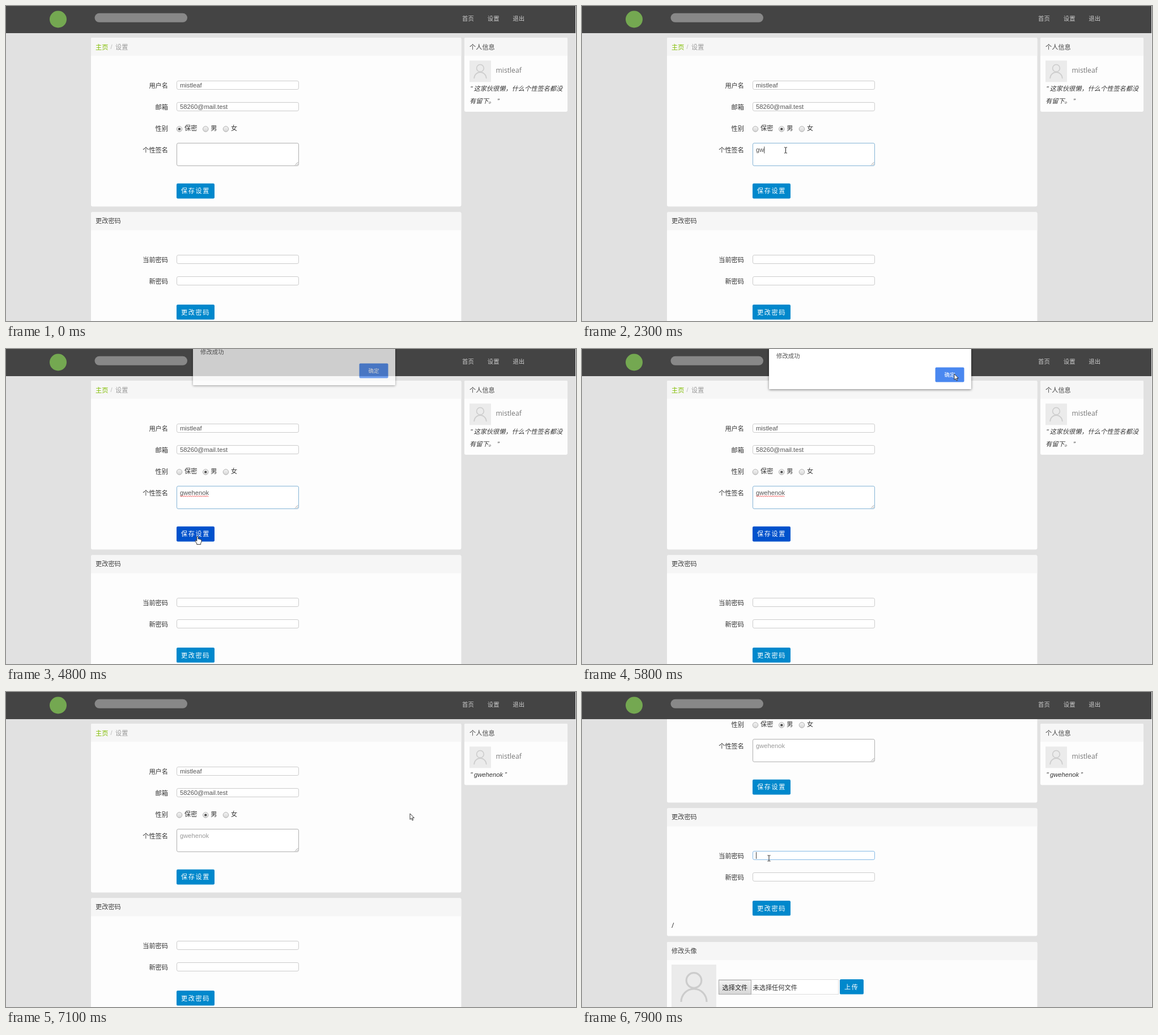
An HTML page that plays this animation: 1006x557 px, repeating every 8000 ms.

```html
<!DOCTYPE html>
<html lang="zh-CN">
<head>
<meta charset="utf-8">
<title>设置</title>
<style>
  html, body { margin: 0; width: 100%; height: 100%; overflow: hidden; background: #e1e1e1; }
  svg { display: block; width: 100%; height: 100%; }
  text { font-family: "Liberation Sans", "Noto Sans CJK SC", "Noto Sans CJK", sans-serif; white-space: pre; }
  .btn { letter-spacing: 1.6px; }
  .ui { font-family: "Open Sans", "Noto Sans CJK SC", sans-serif; }
  #dialog rect.box { filter: drop-shadow(0 1px 2px rgba(0, 0, 0, .5)); }
</style>
</head>
<body>
<svg id="stage" viewBox="0 0 1006 557" preserveAspectRatio="none">
  <defs>
    <linearGradient id="gray" x2="0" y2="1">
      <stop stop-color="#f4f4f4"/><stop offset="1" stop-color="#d6d6d6"/>
    </linearGradient>
    <clipPath id="view"><rect y="48" width="1006" height="509"/></clipPath>
    <g id="person" fill="none" stroke="#ccc" stroke-width="3.2">
      <rect width="79" height="79" fill="#ebebeb" stroke="none"/>
      <circle cx="39.5" cy="28" r="13.3"/>
      <path d="M17 66A22.5 23 0 0 1 62 66"/>
    </g>
  </defs>
  <g clip-path="url(#view)"><g id="page"></g></g>
  <g id="side"></g>
  <g id="top"></g>
  <g id="dialog"></g>
  <g id="cursor">
    <path id="arrow" d="M0 0V10.4L2.4 8.2L4 12L5.7 11.3L4.1 7.6H7.4Z" fill="#fff" stroke="#222" stroke-width=".9"/>
    <path id="beam" d="M-2.5 -5H-.6L0 -4.4L.6 -5H2.5M0 -4.4V4.4M-2.5 5H-.6L0 4.4L.6 5H2.5" fill="none" stroke="#222" stroke-width="1"/>
    <path id="hand" d="M-1.2 .9Q0 -.4 1.1 .9V5L2.6 4.8L3.2 5.3L4.6 5.2L5.2 5.9Q7 5.6 7 7.3V10L5.7 12.2V14.6H-1.2V13L-4 8.8Q-4.4 7.3 -2.9 7.3L-1.2 8.8Z" fill="#fff" stroke="#222" stroke-width=".9"/>
  </g>
</svg>
<script>
const $ = id => document.getElementById(id);
const USER = "mistleaf", MAIL = "58260@mail.test", NOTE = "gwehenok";
const LOOP = 8000, SCROLL = 159;

const rect = (x, y, w, h, fill, extra = "") =>
  `<rect x="${x}" y="${y}" width="${w}" height="${h}" fill="${fill}" ${extra}/>`;
const text = (x, y, str, fill = "#444", size = 11.2, extra = "") =>
  `<text x="${x}" y="${y}" fill="${fill}" font-size="${size}" ${extra}>${str}</text>`;
const label = (y, str) => text(286, y + 4.2, str, "#333", 11.2, 'text-anchor="end"');
const field = (y, h = 15, stroke = "#ccc", id = "") =>
  rect(301.5, y + .5, 215, h, "#fff", `rx="2.6" stroke="${stroke}" id="${id}"`);
const button = (x, y, w, str, id = "") =>
  rect(x, y, w, 26.6, "#08c", `rx="2.2" id="${id}"`) + text(x + 8, y + 17.5, str, "#fff", 11.2, 'class="btn"');
const panel = (x, y, w, h, id = "") =>
  rect(x, y, w, h, "#fdfdfd", `rx="2.4" id="${id}"`) +
  `<path d="M${x} ${y + 32}v-29.6q0 -2.4 2.4 -2.4h${w - 4.8}q2.4 0 2.4 2.4v29.6z" fill="#f6f6f6"/>`;
const radio = (x, str) =>
  `<circle cx="${x}" cy="217.5" r="4.8" fill="url(#gray)" stroke="#aaa" stroke-width=".9"/>` +
  text(x + 9, 220.4, str, "#333");
const caret = (id, y) => rect(307, y, 1, 12, "#444", `id="${id}"`);

$("page").innerHTML =
  panel(150, 56, 653.5, 298.5) +
  text(158, 76.6, "主页", "#80bd01") + text(184.5, 76.4, "/", "#bbb") + text(193, 76.6, "设置", "#999") +
  label(140.3, "用户名") + field(132) + text(307, 143.6, USER, "#555") +
  label(178.4, "邮箱") + field(170) + text(307, 181.8, MAIL, "#555") +
  label(216.4, "性别") + radio(306, "保密") + radio(352.3, "男") + radio(388, "女") +
  `<circle id="dot" cy="217.5" r="2.1" fill="#444"/>` +
  label(254.8, "个性签名") + field(242, 40, "#aaa", "area") +
  `<path d="M510 281.5L515.5 276M513 281.5L515.5 279" stroke="#888" stroke-width=".8"/>` +
  text(307, 258, "", "#555", 11.2, 'id="note"') + caret("noteCaret", 248.5) +
  `<path id="wave" d="M307 260.3${"q.9 -1.5 1.8 0t1.8 0".repeat(14)}" fill="none" stroke="#e33" stroke-width=".9"/>` +
  button(301, 313.8, 67, "保存设置", "save") +
  panel(150, 364.5, 653.5, 226) + text(158, 384.4, "更改密码") +
  label(448.4, "当前密码") + field(440, 15, "#ccc", "pass") + caret("passCaret", 442) +
  label(486.6, "新密码") + field(478) +
  button(301, 528, 67, "更改密码") + text(158, 575.5, "/", "#333", 12, 'class="ui"') +
  panel(150, 601, 653.5, 160) + text(158, 621.4, "修改头像") +
  `<use href="#person" x="158" y="641"/>` +
  rect(241.5, 667.5, 211, 26, "#fff", 'stroke="#ddd"') +
  rect(241.5, 668.5, 57, 25, "url(#gray)", 'stroke="#aaa"') +
  text(247.5, 685.8, "选择文件", "#222") + text(301.5, 685.8, "未选择任何文件", "#333") +
  button(455, 667, 42, "上传");

$("side").innerHTML =
  panel(809, 56, 182, 131, "card") + text(818, 76.6, "个人信息") +
  `<use href="#person" transform="translate(818 96.5) scale(.48)"/>` +
  text(864.5, 118.3, USER, "#777", 12.2, 'class="ui"') +
  `<g font-style="italic">` + text(819.5, 149.8, '"', "#333") +
  `<g id="oldNote">` + text(825.5, 150, "这家伙很懒，什么个性签名都没", "#333") +
  text(818, 172, "有留下。", "#333") + text(867, 172, "”", "#333") + `</g>` +
  `<g id="newNote">` + text(826, 149.6, NOTE, "#333") + text(880, 149.6, "”", "#333") + `</g></g>`;

$("top").innerHTML =
  rect(0, 0, 1005, 48, "#444") + rect(1005, 0, 1, 557, "#eee") +
  `<circle cx="92" cy="23.5" r="15" fill="#74a851"/>` +
  rect(156.5, 12.8, 163.5, 16, "#888", 'rx="8"') +
  text(805, 26.4, "首页", "#ccc", 10.4) + text(849.8, 26.4, "设置", "#ccc", 10.4) + text(894.3, 26.4, "退出", "#ccc", 10.4);

$("dialog").innerHTML =
  rect(330, -20, 357, 91, "#fff", 'rx="1" class="box"') +
  text(343, 15.6, "修改成功", "#555", 10.4) +
  rect(623.5, 32.5, 51, 26, "#4a88f0", 'rx="2"') +
  text(649, 49.2, "确定", "#fff", 9.6, 'text-anchor="middle"');

// time, x, y of the pointer's hot spot
const path = [
  [200, 980, 59], [500, 600, 250], [600, 460, 262], [900, 352, 215], [1400, 352, 215],
  [1700, 359, 251], [1800, 359, 251], [1900, 359.5, 255], [2600, 359.5, 255], [2900, 366, 290],
  [3300, 328, 342], [3500, 328, 345], [3700, 333, 350], [3900, 335, 341], [4200, 338, 331],
  [4800, 338, 331], [5000, 390, 268], [5300, 620, 85], [5500, 662, 38], [5600, 657, 44],
  [6300, 657, 44], [6400, 657, 53], [6500, 657, 53], [6800, 702, 138], [7100, 713, 215],
  [7300, 713, 215], [7400, 609, 298], [7600, 330, 294], [LOOP, 330, 294]
];

function pointer(t) {
  const i = path.findIndex(k => k[0] > t);
  const [t0, x0, y0] = path[i - 1], [t1, x1, y1] = path[i];
  const p = (t - t0) / (t1 - t0);
  return [x0 + (x1 - x0) * p, y0 + (y1 - y0) * p];
}

// value of the last step reached
const step = (t, steps) => steps.filter(s => s[0] <= t).pop()[1];
const show = (id, on) => $(id).setAttribute("display", on ? "inline" : "none");
const set = (id, name, value) => $(id).setAttribute(name, value);

function draw(time) {
  const t = Math.floor(time / 100) * 100;
  const saved = t >= 6000;
  const scroll = step(t, [[0, 0], [7200, 42], [7300, 130], [7400, SCROLL]]);
  set("page", "transform", `translate(0 ${-scroll})`);

  set("dot", "cx", t < 1400 ? 306 : 352.3);
  const typed = step(t, [[0, 0], [2200, 1], [2300, 2], [2400, 5], [2500, 8]]);
  $("note").textContent = NOTE.slice(0, typed);
  set("note", "fill", saved ? "#999" : "#555");
  const focused = t >= 1900 && !saved;
  set("area", "stroke", focused ? "#85b4d6" : "#b0b0b0");
  const blink = t < 2700 || Math.floor((t - 2700) / 500) % 2 === 1;
  show("noteCaret", focused && t < 3900 && blink);
  set("noteCaret", "x", 307 + $("note").getComputedTextLength());
  show("wave", t >= 4700 && !saved);
  set("save", "fill", t >= 4100 && !saved ? "#0052cc" : "#08c");

  set("card", "height", saved ? 108.5 : 131);
  show("oldNote", !saved);
  show("newNote", saved);

  set("pass", "stroke", t >= 7800 ? "#85b9e6" : "#ccc");
  show("passCaret", t >= 7800);

  const alpha = step(t, [[0, 0], [4700, .35], [4800, .74], [4900, 1], [5900, .4], [6000, 0]]);
  const lift = step(t, [[0, -15], [4800, -7], [4900, 0], [5900, -7]]);
  set("dialog", "opacity", alpha);
  set("dialog", "transform", `translate(0 ${lift})`);

  show("cursor", t >= 200);
  if (t < 200) return;
  const [x, y] = pointer(t);
  const over = (l, top, r, b) => x >= l && x <= r && y >= top - scroll && y <= b - scroll;
  const onField = !alpha && (over(301, 242, 517, 283) || over(301, 440, 517, 456));
  const kind = over(301, 313, 368, 341) ? "hand" : onField ? "beam" : "arrow";
  for (const id of ["arrow", "beam", "hand"]) show(id, id === kind);
  set("cursor", "transform", `translate(${x} ${y})`);
}

const start = performance.now();
function frame() {
  draw((performance.now() - start) % LOOP);
  requestAnimationFrame(frame);
}
frame();
</script>
</body>
</html>
```
